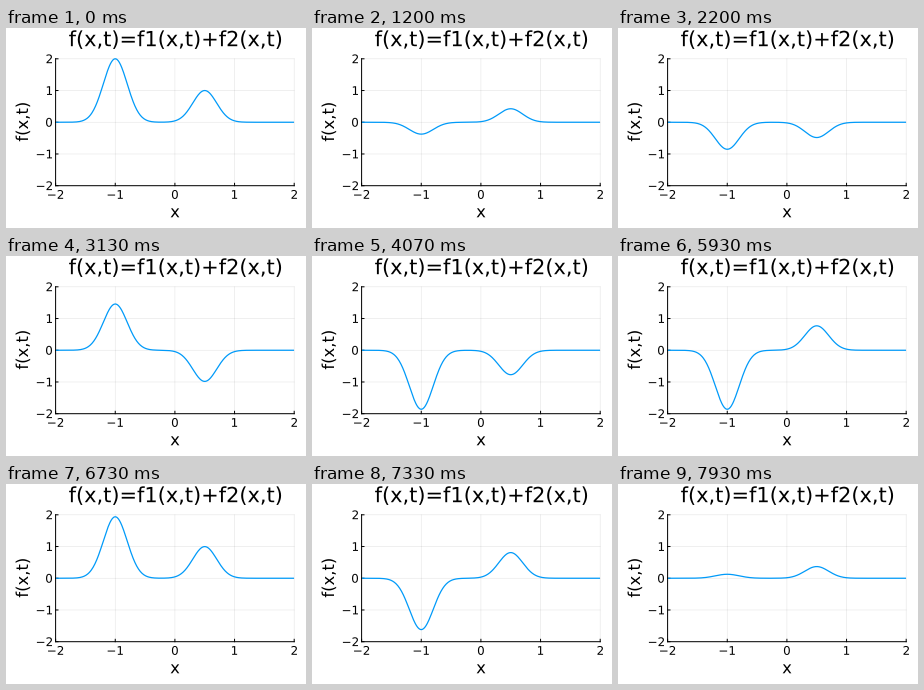
These frames come from a looping animation (300 px wide and 200 px high, 8000 ms). A matplotlib script:

```python
import numpy as np
import matplotlib.pyplot as plt
from matplotlib.animation import FuncAnimation
from matplotlib.patches import PathPatch
from matplotlib.textpath import TextPath
from matplotlib.transforms import Affine2D

W, H, DPI = 300, 200, 100
LOOP, TICK = 8000, 20   # ms
STEP = 200 / 3          # ms between two poses of the wave
LEFT, RIGHT, TOP, BOTTOM = 49.6, 288.2, 30.8, 157.7
TICKS = range(-2, 3)
PT = 72 / DPI           # points per pixel

plt.rcParams["font.family"] = "DejaVu Sans"
plt.rcParams["path.snap"] = False

fig = plt.figure(figsize=(W / DPI, H / DPI), dpi=DPI, facecolor="white")
stage = fig.add_axes([0, 0, 1, 1])
stage.set(xlim=(0, W), ylim=(H, 0))
stage.axis("off")


def px(x):
    return LEFT + (x + 2) / 4 * (RIGHT - LEFT)


def py(y):
    return BOTTOM - (y + 2) / 4 * (BOTTOM - TOP)


def line(x, y, color="black", width=1.0, **kw):
    return stage.plot(x, y, color=color, lw=width * PT, **kw)[0]


def text(x, y, s, size, align=0.5, angle=0):
    """Draw outlined text so that it keeps its place between pixels."""
    path = TextPath((0, 0), s, size=size)
    box = path.get_extents()
    move = Affine2D().translate(-box.x0 - align * box.width, 0)
    move.rotate_deg(angle).scale(1, -1).translate(x, y)
    stage.add_patch(PathPatch(move.transform_path(path), fc="black", lw=0))


for k in TICKS:
    line([px(k)] * 2, [TOP, BOTTOM], width=0.6, alpha=0.1)
    line([LEFT, RIGHT], [py(k)] * 2, width=0.6, alpha=0.1)
for k in TICKS:
    line([px(k)] * 2, [BOTTOM, BOTTOM - 2.4])
    line([LEFT, LEFT + 2.4], [py(k)] * 2)
    label = str(k).replace("-", "\u2212")
    text(px(k), 170.8, label, 11.9)
    text(46, py(k) + 4.4, label, 11.9, align=1)
line([LEFT, LEFT, RIGHT], [TOP, BOTTOM, BOTTOM])

text(169.1, 18.2, "f(x,t)=f1(x,t)+f2(x,t)", 20.9)
text(169, 189.3, "x", 16.4)
text(22, 94.2, "f(x,t)", 16.4, angle=90)

xs = np.linspace(-2, 2, 401)
bump1 = 2 * np.exp(-12.5 * (xs + 1) ** 2)
bump2 = np.exp(-12.5 * (xs - 0.5) ** 2)
curve = line(px(xs), py(0 * xs), "#009af9", 1.25, zorder=5)
clip = plt.Rectangle((LEFT, TOP - 0.5), RIGHT - LEFT, BOTTOM - TOP + 1,
                     transform=stage.transData)
curve.set_clip_path(clip)


def update(i):
    pose = int((i * TICK + 15) / STEP)
    phase = 2 * np.pi * pose / 100
    f = bump1 * np.cos(4 * phase) + bump2 * np.cos(phase)
    curve.set_ydata(py(f))
    return [curve]


anim = FuncAnimation(fig, update, frames=LOOP // TICK, interval=TICK,
                     repeat=True, repeat_delay=0)
plt.show()
```
